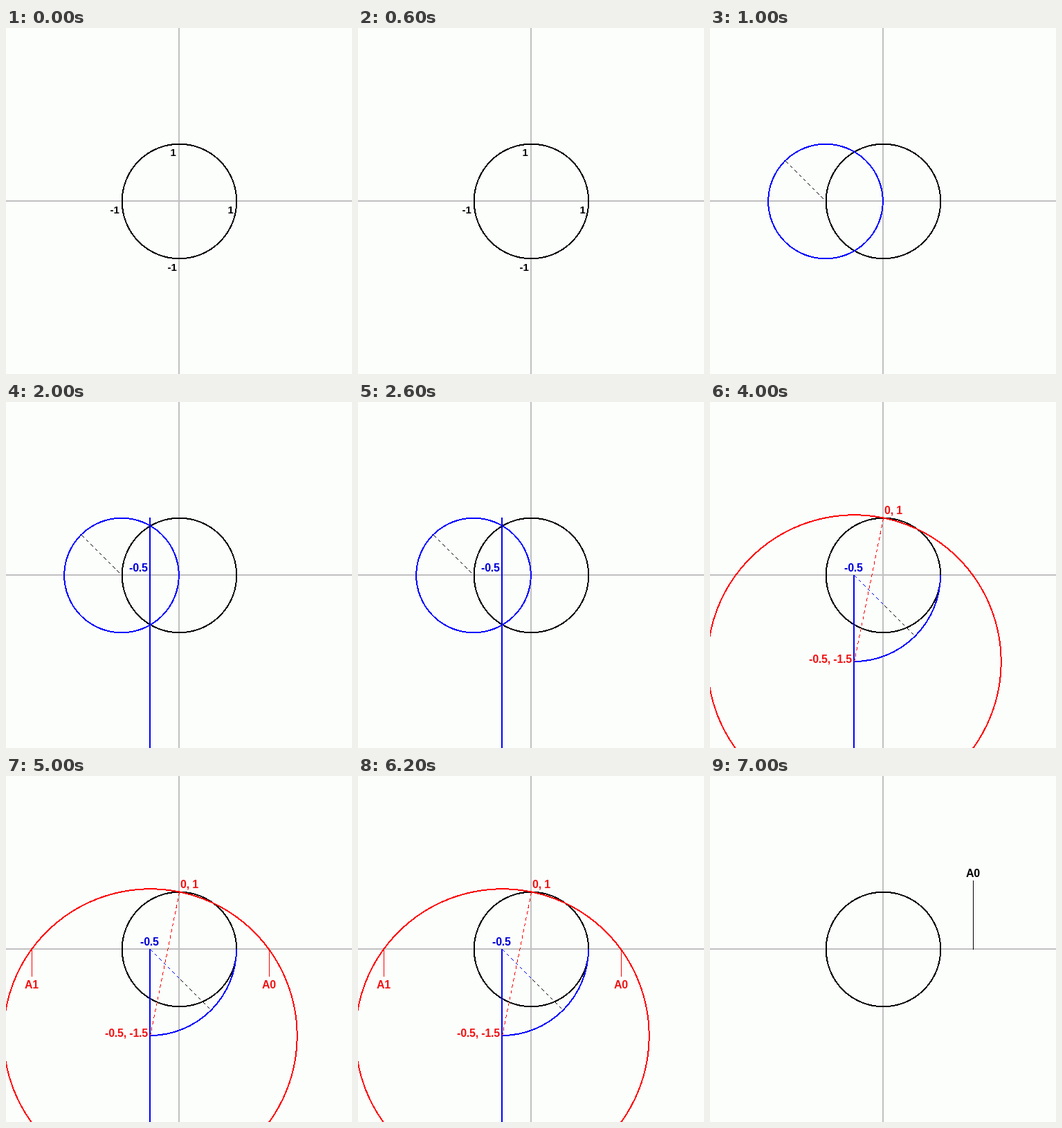
Write an HTML page that moves like this. It is 500x500 px and loops after 8 s.

```html
<!DOCTYPE html>
<html lang="en">
<head>
<meta charset="utf-8">
<title>Circle construction</title>
<style>
html, body { margin: 0; width: 100%; height: 100%; overflow: hidden; background: #fcfefc; }
svg { display: block; width: 100vw; height: 100vh; }
.lines { fill: none; stroke-width: 2; shape-rendering: crispEdges; }
.thin { stroke-width: 1; }
.dash { stroke-width: 1; stroke-dasharray: 5 4; }
text { font: bold 16px "Liberation Sans", Arial, sans-serif; letter-spacing: -.2px; }
.units text { font-size: 15px; letter-spacing: 0; }
.black { stroke: #000; }
.blue { stroke: #00f; }
.red { stroke: #f00; }
text.blue { fill: #0000d8; stroke: none; }
text.red { fill: #f01414; stroke: none; }

/* hard cuts: each step is visible for its own part of the loop */
.step { visibility: hidden; animation: 8s step-end infinite; }
.units  { animation-name: units; }
.unit2  { animation-name: unit2; }
.half   { animation-name: half; }
.arc    { animation-name: arc; }
.large  { animation-name: large; }
.roots  { animation-name: roots; }
.result { animation-name: result; }
@keyframes units  { 0% { visibility: visible } 12.5%, 100% { visibility: hidden } }
@keyframes unit2  { 0% { visibility: hidden } 12.5% { visibility: visible } 37.5%, 100% { visibility: hidden } }
@keyframes half   { 0% { visibility: hidden } 25% { visibility: visible } 37.5%, 100% { visibility: hidden } }
@keyframes arc    { 0% { visibility: hidden } 37.5% { visibility: visible } 87.5%, 100% { visibility: hidden } }
@keyframes large  { 0% { visibility: hidden } 50% { visibility: visible } 87.5%, 100% { visibility: hidden } }
@keyframes roots  { 0% { visibility: hidden } 62.5% { visibility: visible } 87.5%, 100% { visibility: hidden } }
@keyframes result { 0% { visibility: hidden } 87.5%, 100% { visibility: visible } }
</style>
</head>
<body>
<svg viewBox="0 0 500 500">
  <g class="lines">
    <path d="M0 250H500M250 0V500" stroke="#c0c0c0"/>
    <circle class="black" cx="250.5" cy="250.5" r="82.8"/>
  </g>

  <g class="step units">
    <text x="237.5" y="185">1</text>
    <text x="150.5" y="268">-1</text>
    <text x="320.5" y="268">1</text>
    <text x="233.5" y="351">-1</text>
  </g>

  <g class="step unit2 lines">
    <path class="black dash" d="M109.5 192.5L167.5 250.5"/>
    <circle class="blue" cx="167" cy="250.5" r="82.8"/>
  </g>

  <g class="step half">
    <path class="blue lines" d="M208 167V500"/>
    <text class="blue" x="178" y="245">-0.5</text>
  </g>

  <g class="step arc">
    <g class="lines">
      <path class="blue dash" d="M208.5 250.5L252.5 294.5"/>
      <path class="black dash" d="M252.5 294.5L296.5 338.5"/>
      <path class="blue" d="M208 250V500M333 250A125 125 0 0 1 208 375"/>
    </g>
    <text class="blue" x="194" y="245">-0.5</text>
    <text class="red" x="143" y="377">-0.5, -1.5</text>
  </g>

  <g class="step large">
    <g class="lines red">
      <path class="dash" d="M250.5 168.5L208.5 375.5"/>
      <circle cx="208.5" cy="375.5" r="212.2"/>
    </g>
    <text class="red" x="252" y="162">0, 1</text>
  </g>

  <g class="step roots">
    <path class="lines thin red" d="M37.5 250V290M380.5 250V290"/>
    <text class="red" x="27" y="307">A1</text>
    <text class="red" x="370" y="307">A0</text>
  </g>

  <g class="step result">
    <path class="lines thin black" d="M380.5 151V251"/>
    <text x="370" y="146">A0</text>
  </g>
</svg>
</body>
</html>
```
